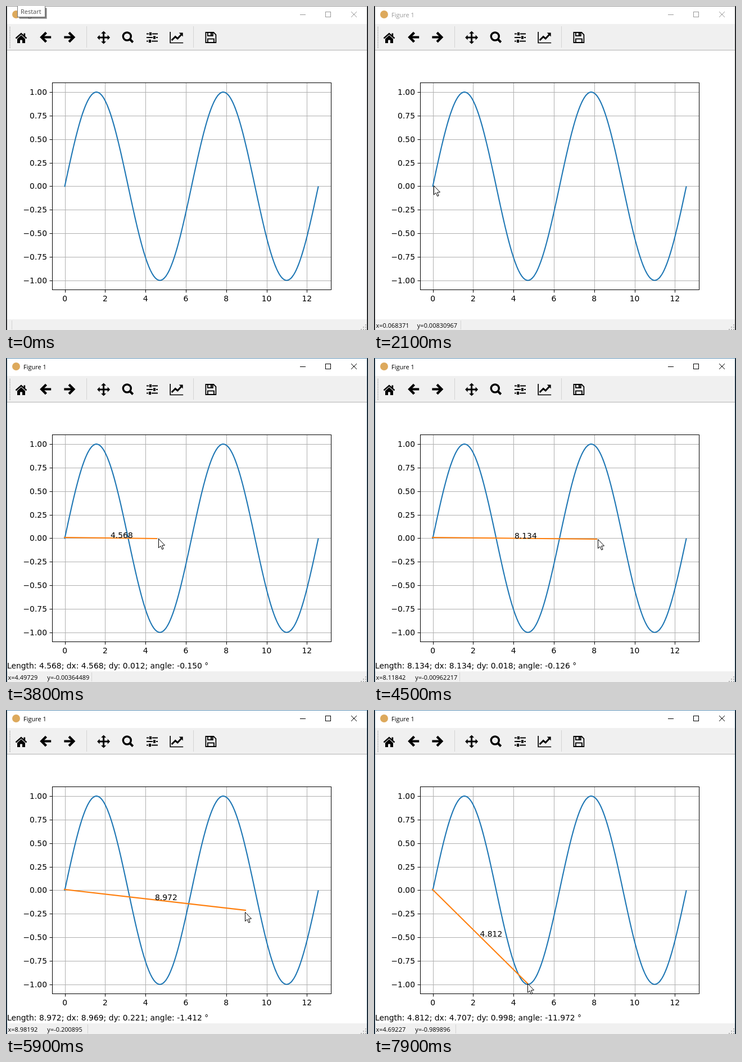
An HTML page with a canvas that plays this animation: 644x576 px, repeating every 8000 ms.

```html
<!DOCTYPE html>
<html lang="en">
<head>
<meta charset="utf-8">
<title>Figure 1</title>
<style>
  html, body { margin: 0; width: 100%; height: 100%; overflow: hidden; background: #fff; }
  canvas { display: block; }
</style>
</head>
<body>
<canvas id="stage" width="644" height="576"></canvas>
<script>
const ctx = document.getElementById('stage').getContext('2d');
const LOOP = 8000, STEP = 100;
const TOOLTIP_END = 300, ACTIVATED = 2600, MEASURING = 2800;
const UI_FONT = '11px "Open Sans", sans-serif';
const PLOT_FONT = '13.89px "DejaVu Sans", sans-serif';

// Plot geometry: pixel position of the origin and data units per pixel
const axes = { left: 82, top: 136.36, right: 578, bottom: 504.42 };
const END_X = 12.56;
const ORIGIN = { x: 82 + 496 / 22, y: 320.39021 };
const UNIT = { x: END_X * 1.1 / 496, y: 0.00597728 };
const toPx = (x, y) => [ORIGIN.x + x / UNIT.x, ORIGIN.y - y / UNIT.y];
const toData = ([px, py]) => [(px - ORIGIN.x) * UNIT.x, (ORIGIN.y - py) * UNIT.y];
const snap = v => Math.round(v) + 0.5;

// The mouse glides straight to each goal between two times and rests in between
const ENTRY = [60, 10], ANCHOR = [104, 319];
const moves = [
  { from: 300, to: 700, goal: [316, 230] },
  { from: 700, to: 1300, goal: [133, 322] },
  { from: 1330, to: 2200, goal: ANCHOR },
  { from: 2900, to: 3000, goal: [119, 319] },
  { from: 3010, to: 4500, goal: [396, 322] },
  { from: 4510, to: 5100, goal: [443, 320] },
  { from: 5700, to: 5929, goal: [424.5, 359] },
  { from: 6060, to: 6700, goal: [295, 471] },
  { from: 6710, to: 7200, goal: [273, 485] },
  { from: 7700, to: 7900, goal: [273, 486] }
];
// The status bar lags slightly behind the measuring line, and both behind the cursor
const LINE_LEAD = 10, CURSOR_LEAD = 30;

function mouseAt(t) {
  let [x, y] = ENTRY;
  for (const { from, to, goal } of moves) {
    const k = Math.min(1, Math.max(0, (t - from) / (to - from)));
    x += (goal[0] - x) * k;
    y += (goal[1] - y) * k;
  }
  return [x, y];
}
const pixelAt = t => mouseAt(t).map(Math.round);

function rect(color, x, y, w, h) {
  ctx.fillStyle = color;
  ctx.fillRect(x, y, w, h);
}
function trace(points, close) {
  ctx.beginPath();
  points.forEach(([x, y]) => ctx.lineTo(x, y));
  if (close) ctx.closePath();
}
function stroke(color, width) {
  ctx.strokeStyle = color;
  ctx.lineWidth = width;
  ctx.stroke();
}
function line(color, width, ...points) {
  trace(points);
  stroke(color, width);
}
function poly(color, ...points) {
  trace(points, true);
  ctx.fillStyle = color;
  ctx.fill();
}
function circle(x, y, r) {
  ctx.beginPath();
  ctx.arc(x, y, r, 0, 2 * Math.PI);
}
function text(str, x, y, font, color = '#000', align = 'left') {
  ctx.font = font;
  ctx.fillStyle = color;
  ctx.textAlign = align;
  ctx.fillText(str, x, y);
}

function drawWindow(active) {
  const ink = active ? '#000' : '#999';
  rect('#fff', 0, 0, 644, 576);
  rect('#f0f0f0', 2, 32, 640, 46);
  rect('#b4b4b4', 2, 78, 640, 1);
  rect('#f0f0f0', 2, 557, 640, 19);

  circle(18, 15, 7);
  ctx.fillStyle = '#dda95c';
  ctx.fill();
  text('Figure 1', 31, 20, UI_FONT, ink);
  line(ink, 1, [523, 15.5], [533, 15.5]);
  ctx.strokeRect(568.5, 10.5, 9, 9);
  line(ink, 1, [614, 10], [624, 20]);
  line(ink, 1, [624, 10], [614, 20]);

  const side = active ? '#2c4a60' : '#4a4a4a';
  rect(active ? '#5f93b8' : '#9a9a9a', 0, 0, 644, 1);
  for (const [border, desktop] of [[1, 0], [642, 643]]) {
    rect(side, border, 1, 1, 575);
    rect('#0e1218', desktop, 0, 1, 576);
  }

  for (let y = 37; y < 75; y += 3) rect('#b8b8b8', 6, y, 2, 1.5);
  for (const x of [143, 333]) rect('#d4d4d4', x, 36, 1, 38);
  for (let r = 0; r < 3; r++)
    for (let c = 0; c <= r; c++) rect('#b5b5b5', 639 - c * 4, 566 + r * 4, 2, 2);
}

// Icons are drawn around their own centre
const icons = [
  function home() {
    line('#000', 2.4, [-9.5, 1.5], [0, -7], [9.5, 1.5]);
    poly('#000', [-7, 2.5], [0, -4], [7, 2.5], [7, 10], [-7, 10]);
    rect('#f0f0f0', -2, 4.5, 4, 5.5);
    rect('#000', 4.5, -7.5, 2.7, 5);
  },
  () => arrow(-1),
  () => arrow(1),
  function pan() {
    for (let i = 0; i < 4; i++) {
      rect('#000', -1.5, -1.5, 9, 3);
      poly('#000', [11.5, 0], [7, -4.5], [7, 4.5]);
      ctx.rotate(Math.PI / 2);
    }
  },
  function zoom() {
    circle(-1.5, -2, 7);
    stroke('#000', 3.4);
    line('#000', 4, [3.5, 3], [9, 8.5]);
  },
  function sliders() {
    [-5, 2, -6].forEach((knob, i) => {
      const y = (i - 1) * 6.5;
      rect('#000', -10, y - 1, 20, 2);
      rect('#f0f0f0', knob - 1, y - 2, 6, 4);
      rect('#000', knob, y - 2.7, 4, 5.4);
    });
  },
  function chart() {
    line('#000', 1.7, [-11, -10], [-11, 9.5], [12, 9.5]);
    line('#000', 3, [-8.5, 5], [-2, -1.5], [2, 2], [9, -5.5]);
    poly('#000', [4.5, -8.5], [11.5, -8.5], [11.5, -1.5]);
  },
  function save() {
    trace([[-9, -9], [5, -9], [9, -5], [9, 9], [-9, 9]], true);
    stroke('#000', 1.8);
    ctx.strokeRect(-5.5, -9, 9, 6);
    ctx.strokeRect(-5.5, 2.5, 11, 6.5);
    rect('#000', -0.5, -8.5, 2.5, 4.5);
  }
];
function arrow(dir) {
  ctx.scale(dir, 1);
  line('#000', 4.4, [-1.3, -8.7], [6.9, -0.5], [-1.3, 7.7]);
  rect('#000', -10, -2.5, 16, 4);
}
function drawIcons() {
  icons.forEach((draw, i) => {
    ctx.save();
    ctx.translate(27 + 43.2 * i + (i > 2 ? 17 : 0) + (i > 6 ? 18 : 0), 56);
    draw();
    ctx.restore();
  });
}

function drawPlot() {
  const [left, top, right, bottom] = [axes.left, axes.top, axes.right, axes.bottom].map(snap);
  for (let v = 0; v <= 12; v += 2) {
    const x = toPx(v, 0)[0], sx = snap(x);
    line('#b0b0b0', 1, [sx, top], [sx, bottom]);
    line('#000', 1, [sx, bottom], [sx, bottom + 5]);
    text(v, x, 525, PLOT_FONT, '#000', 'center');
  }
  for (let v = -1; v <= 1; v += 0.25) {
    const y = toPx(0, v)[1], sy = snap(y);
    line('#b0b0b0', 1, [left, sy], [right, sy]);
    line('#000', 1, [left - 5, sy], [left, sy]);
    text(v.toFixed(2).replace('-', '\u2212'), 73, Math.round(y) + 5, PLOT_FONT, '#000', 'right');
  }
  const curve = [];
  for (let x = 0; x <= END_X; x += 0.04) curve.push(toPx(x, Math.sin(x)));
  ctx.lineCap = 'square';
  ctx.lineJoin = 'round';
  line('#1f77b4', 2.08, ...curve);
  ctx.lineCap = 'butt';
  ctx.lineJoin = 'miter';
  ctx.strokeStyle = '#000';
  ctx.lineWidth = 1;
  ctx.strokeRect(left, top, right - left, bottom - top);
}

function drawMeasurement(end) {
  const [x0, y0] = toData(ANCHOR), [x1, y1] = toData(end);
  const dx = x1 - x0, dy = y1 - y0;
  const length = Math.hypot(dx, dy).toFixed(3);
  const angle = (Math.atan2(dy, dx) * 180 / Math.PI).toFixed(3);
  ctx.lineCap = 'square';
  line('#ff7f0e', 2.08, ANCHOR, end);
  ctx.lineCap = 'butt';
  text(length, (ANCHOR[0] + end[0]) / 2, Math.round((ANCHOR[1] + end[1]) / 2), PLOT_FONT);
  text(`Length: ${length}; dx: ${Math.abs(dx).toFixed(3)}; dy: ${Math.abs(dy).toFixed(3)}; angle: ${angle} °`,
    2, 552, PLOT_FONT);
}

function drawStatus(pixel) {
  const [px, py] = pixel;
  const inside = px > axes.left && px < axes.right && py > axes.top && py < axes.bottom;
  let separator = 10;
  if (inside) {
    const [x, y] = toData(pixel).map(v => String(+v.toPrecision(6)).padEnd(12));
    const status = `x=${x} y=${y}`;
    text(status, 3.5, 572, UI_FONT);
    separator = Math.round(4 + ctx.measureText(status).width);
  }
  rect('#d4d4d4', separator, 559, 1, 16);
}

function drawTooltip() {
  rect('rgba(0,0,0,.25)', 24, 4, 49, 19);
  rect('rgba(0,0,0,.35)', 23, 3, 49, 19);
  rect('#767676', 20, 0, 50, 20);
  rect('#fff', 21, 0, 48, 19);
  text('Restart', 26, 14, UI_FONT, '#4c4c4c');
}

function drawCursor([x, y]) {
  ctx.save();
  ctx.translate(snap(x), snap(y));
  trace([[0, 0], [0, 16], [3.6, 12.7], [6.2, 18.7], [8.6, 17.7], [6.1, 11.8], [11, 11.5]], true);
  ctx.fillStyle = '#fff';
  ctx.fill();
  stroke('#000', 1);
  ctx.restore();
}

function render(now) {
  const t = Math.floor(now % LOOP / STEP) * STEP;
  drawWindow(t >= ACTIVATED);
  drawIcons();
  drawPlot();
  drawStatus(t < TOOLTIP_END ? [0, 0] : pixelAt(t));
  if (t >= MEASURING) drawMeasurement(pixelAt(t + LINE_LEAD));
  if (t < TOOLTIP_END) drawTooltip();
  else drawCursor(mouseAt(t + CURSOR_LEAD));
}

const begin = performance.now();
function tick() {
  render(performance.now() - begin);
  requestAnimationFrame(tick);
}
tick();
</script>
</body>
</html>
```
